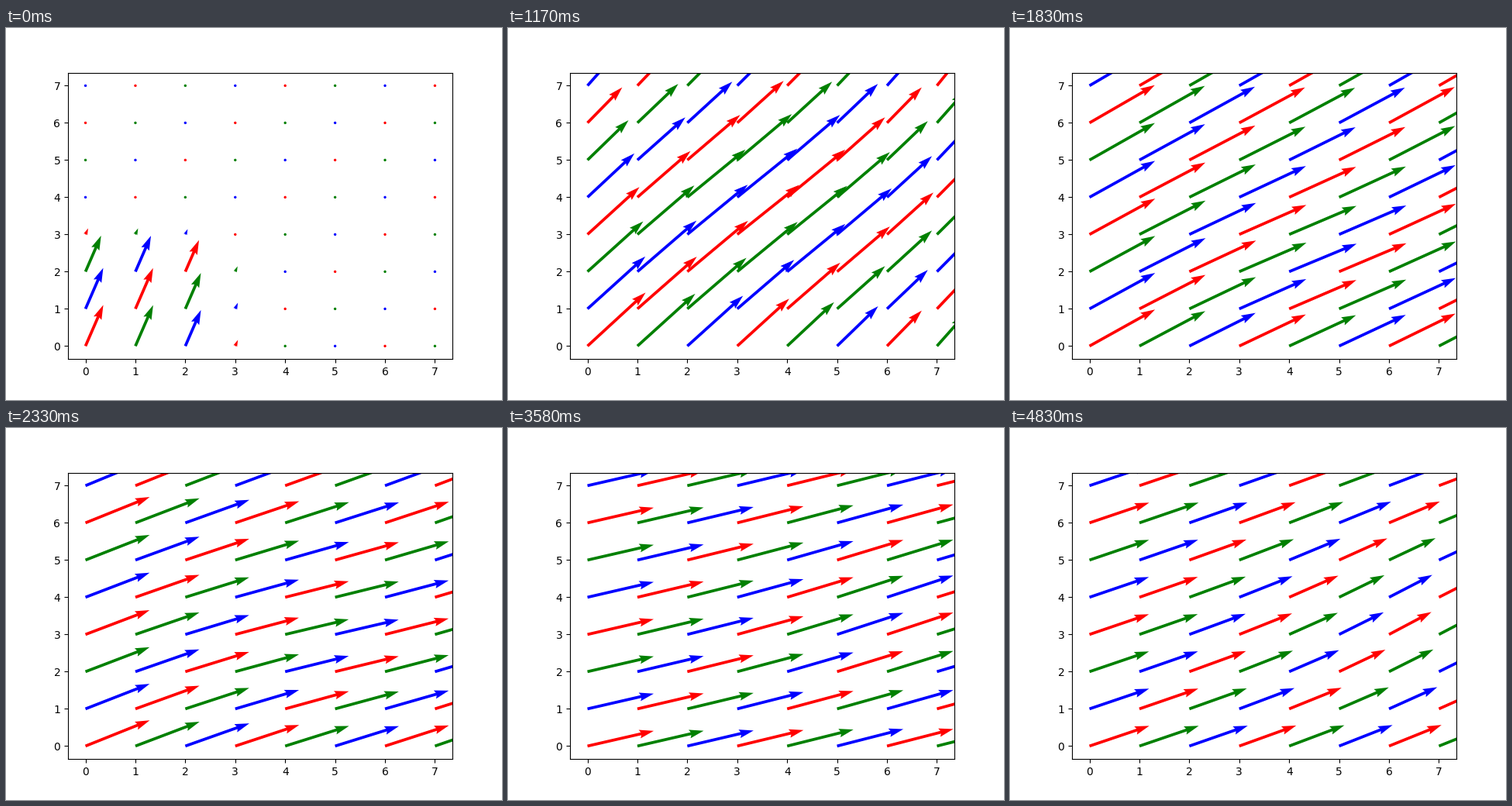
Recreate the animation shown at these times as a matplotlib script. Size 640 by 480 pixels, loop 4.91 s.

```python
import numpy as np
import matplotlib.pyplot as plt
from matplotlib.animation import FuncAnimation

FRAMES = 59
LOOP_MS = 4910
N = 8
RISE = 14  # frames until the flow has spread over the grid

X, Y = np.meshgrid(np.arange(N), np.arange(N))


def pair(u, v):
    return np.array([u, v], dtype=float)[:, None, None]


def block():
    """A patch of equal arrows in the lower left corner, soft at its rim."""
    rim = 1 / (1 + np.exp(3.7 * (np.arange(N) - 2.53)))
    return pair(23, 53) * np.outer(rim, rim)


def ridge():
    """Flow fading with distance from the diagonal (0, 0) to (3, 3)."""
    s = np.clip((X + Y) / 2, 0, 3)
    d2 = (X - s) ** 2 + (Y - s) ** 2
    return np.stack([(75 + 1.7 * s) * np.exp(-d2 / 31),
                     (69 - 1.7 * s) * np.exp(-d2 / 54)])


def eddy(base, change, centre, spread):
    """Even flow, changed most at the centre of a Gaussian spot."""
    d2 = (X - centre[0]) ** 2 + (Y - centre[1]) ** 2
    return pair(*base) + pair(*change) * np.exp(-d2 / (2 * spread))


START = block()
STAGES = [
    (RISE, ridge()),
    (22, eddy((84, 50), (3, -14), (4.2, 2.1), 7)),
    (28, eddy((83, 36), (-1, -17), (4.7, 2.9), 8.5)),
    (37, eddy((84.5, 21.5), (3.5, -10), (6.5, 2), 11)),
    (43, eddy((85.5, 19.5), (0, 9), (5.7, 3.4), 4.5)),
    (58, eddy((77.5, 26), (-23, 3), (6.3, 3.2), 6)),
]

# Cells far from the corner start late; the vertical part leads
delay = 0.8 + 0.2 * np.hypot(X - 1, Y - 1)
DELAY = np.stack([delay, 0.65 * delay])


def field(n):
    if n < RISE:
        return START + (STAGES[0][1] - START) * (n / RISE) ** DELAY
    for (n0, a), (n1, b) in zip(STAGES, STAGES[1:]):
        if n <= n1:
            return a + (b - a) * (n - n0) / (n1 - n0)


fig, ax = plt.subplots(figsize=(6.4, 4.8), dpi=100)
arrows = ax.quiver(X, Y, *field(0), color=["r", "g", "b"],
                   scale=1, scale_units="dots")


def update(n):
    arrows.set_UVC(*field(n))
    return (arrows,)


anim = FuncAnimation(fig, update, frames=FRAMES, interval=LOOP_MS / FRAMES,
                     repeat=True, repeat_delay=0, blit=False)
plt.show()
```
